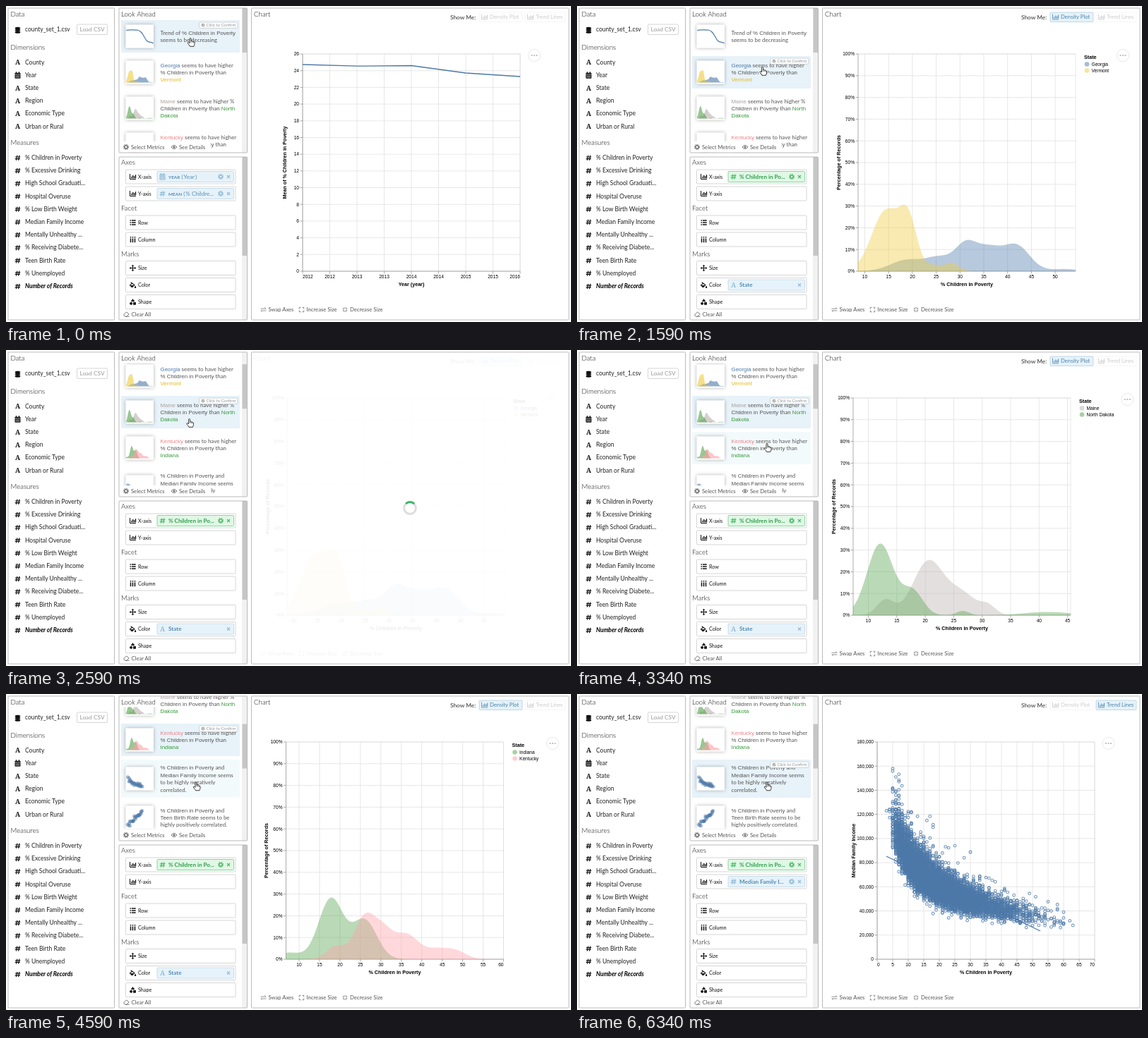
An HTML page for the animation above (6.49 s loop, 800 px wide and 448 px high).

```html
<!DOCTYPE html>
<html lang="en">
<head>
<meta charset="utf-8">
<title>Look Ahead chart explorer</title>
<style>
  html, body { margin: 0; width: 100%; height: 100%; overflow: hidden; background: #fff; }
  svg { display: block; width: 100vw; height: 100vh; font-family: Lato, sans-serif; fill: #222; }
  .arial { font-family: "Liberation Sans", Arial, sans-serif; }
  .light { font-weight: 300; }
  .bold { font-weight: 700; }
  .mid { text-anchor: middle; }
  .end { text-anchor: end; }
</style>
</head>
<body>
<svg id="stage" viewBox="0 0 800 448"></svg>
<script>
const LOOP = 6490;
const BLUE = '#4c78a8', YELLOW = '#eeca3b', GREEN = '#54a24b', GRAY = '#bab0ac', PINK = '#ff9da6';
const range = n => [...Array(n).keys()];
const each = (list, f) => list.map(f).join('');

// Drawing helpers; text is centred vertically on y
const text = (x, y, s, size = 8.5, cls = '', fill = '#222') =>
  `<text x="${x}" y="${y + size * .35}" font-size="${size}" class="${cls}" fill="${fill}">${s}</text>`;
const rect = (x, y, w, h, fill = '#fff', stroke = 'none', r = 0) =>
  `<rect x="${x}" y="${y}" width="${w}" height="${h}" rx="${r}" fill="${fill}" stroke="${stroke}" stroke-width=".8"/>`;
const line = (d, stroke, w = 1, extra = '') =>
  `<path d="${d}" fill="none" stroke="${stroke}" stroke-width="${w}" ${extra}/>`;
const fill = (d, color, alpha = 1) => `<path d="${d}" fill="${color}" fill-opacity="${alpha}"/>`;
const dot = (x, y, r, color, extra = '') => `<circle cx="${x}" cy="${y}" r="${r}" fill="${color}" ${extra}/>`;
const at = (x, y, s) => `<g transform="translate(${x} ${y})">${s}</g>`;
const group = (id, s) => `<g id="${id}">${s}</g>`;

const icons = {
  hash: c => line('M-.6-3.6l-1.5 7.2M2.5-3.6l-1.5 7.2M-3.4-1.3h7.2M-3.8 1.3h7.2', c, 1.2),
  letter: c => `<text y="3.3" font-size="9.5" text-anchor="middle" font-weight="900" font-family="Noto Serif, serif" fill="${c}">A</text>`,
  calendar: c => rect(-4, -3.5, 8, 8, c, 'none', .8) + line('M-2-5v2.5M2-5v2.5', c, 1.3) +
    line('M-4-1.2h8M-3 1h6M-3 2.8h6', '#fff', .6),
  database: c => each(range(3), i => fill(`M-3.7 ${i * 2.8 - 3.3}q3.7-1.8 7.4 0v1.6q-3.7 1.8-7.4 0z`, c)),
  gear: c => `<g fill="none" stroke="${c}"><circle r="2.2" stroke-width="1.6"/><circle r="3.4" stroke-width="1.2" stroke-dasharray="1.4 1.27"/></g>`,
  eye: c => line('M-4 0Q0-5 4 0Q0 5-4 0z', c, 1) + dot(0, 0, 1.6, c),
  bars: c => line('M-4-4v7.5h8.5', c, 1) + line('M-1.8 2.2v-2.5M.2 2.2v-4.2M2.2 2.2v-3M4 2.2v-5', c, 1.3),
  rows: c => line('M-4-3h1.6M-4 0h1.6M-4 3h1.6M-1.5-3h5.7M-1.5 0h5.7M-1.5 3h5.7', c, 1.5),
  columns: c => `<g transform="rotate(90)">${icons.rows(c)}</g>`,
  move: c => line('M-3.6 0h7.2M0-3.6v7.2', c, 1.1) +
    fill('M-4.8 0l2-1.8v3.6zM4.8 0l-2-1.8v3.6zM0-4.8l-1.8 2h3.6zM0 4.8l-1.8-2h3.6z', c),
  paint: c => line('M-2.8-3.8L2.4 0L-1 3.2L-4 .2L-.6-2.4', c, 1.1) + fill('M-3.6.5h5.4l-2.8 2.8zM3.6 1q2.4 3.4 0 3.4t0-3.4', c),
  shapes: c => fill('M0-4.6l2.8 4.2h-5.6z', c) + dot(-2.4, 2.2, 2, c) + rect(.6, .4, 3.8, 3.8, c),
  erase: c => line('M-1 3.2h5M-4 1l4-4.2l3.6 3l-3.2 3.4h-2.6z', c, 1),
  cross: c => line('M-2-2l4 4M2-2l-4 4', c, 1.2),
  swap: c => line('M-4-1.4h7.6l-1.7-1.6M4 1.4h-7.6l1.7 1.6', c, .8),
  expand: c => line('M-3.2-1v-2.2h2.2M1-3.2h2.2v2.2M3.2 1v2.2h-2.2M-1 3.2h-2.2v-2.2', c, .9),
  shrink: c => line('M-3.4-1.2h2.2v-2.2M1.2-3.4v2.2h2.2M3.4 1.2h-2.2v2.2M-1.2 3.4v-2.2h-2.2', c, .9),
};
const icon = (name, x, y, color = '#111') => at(x, y, icons[name](color));

const TOP = 68, BASE = 376, SIDE = 308;

function axes(x0, xTicks, yLabels, xTitle, yTitle, titleX) {
  const x1 = x0 + SIDE, step = SIDE / (yLabels.length - 1);
  let grid = '', ticks = '', labels = '';
  for (const [x, s] of xTicks) {
    const first = x < x0 + 1, last = x > x1 - 2;
    grid += `M${x} ${TOP}V${BASE}`;
    ticks += `M${x} ${BASE}v3.5`;
    labels += text(first ? x0 : last ? x1 : x, 384, s, 6.6, 'arial ' + (first ? '' : last ? 'end' : 'mid'), '#000');
  }
  yLabels.forEach((s, i) => {
    const y = BASE - i * step;
    grid += `M${x0} ${y}H${x1}`;
    ticks += `M${x0} ${y}h-3.5`;
    labels += text(x0 - 5, y, s, 6.6, 'arial end', '#000');
  });
  return line(grid, '#ddd', .7) + line(`M${x0} ${TOP}H${x1}V${BASE}`, '#ddd', .7) +
    line(ticks + `M${x0} ${TOP}V${BASE}H${x1}`, '#888', .7) + labels +
    text(x0 + SIDE / 2, 394, xTitle, 7.16, 'arial bold mid', '#000') +
    `<g transform="translate(${titleX} 222) rotate(-90)">${text(0, 0, yTitle, 7.16, 'arial bold mid', '#000')}</g>`;
}
const fives = (start, x, gap, n) => range(n).map(i => [x + i * gap, start + 5 * i]);
const moreButton = x => dot(x, 70, 8.6, '#fff', 'stroke="#e2e2e2" stroke-width=".8"') +
  each([-3.5, 0, 3.5], d => dot(x + d, 70, 1.1, '#b5b5b5'));

// Each state's density is a sum of bell curves: [poverty %, width, height %]
const states = {
  Vermont: { color: YELLOW, ink: '#e3b920', bells: [[14.5, 3, 28], [19.2, 1.8, 20.5], [24.5, 1.6, 2.6], [28.3, 1.4, 3.8]] },
  Georgia: { color: BLUE, ink: BLUE, bells: [[19, 3.5, 5.3], [25.5, 2.5, 5.5], [31.3, 2.4, 12.8], [36.2, 2.4, 9], [41.8, 2.8, 12], [52, 3, 1]] },
  'North Dakota': { color: GREEN, ink: '#36993a', bells: [[12.1, 2.3, 33], [17.8, 1.8, 11], [26.6, 1.1, 2], [41.5, 4, 1.5]] },
  Maine: { color: GRAY, ink: '#aaa29f', bells: [[13, 1.5, 7], [20.6, 2.7, 25], [26.5, 2.4, 9.5], [31, 1.4, 4]] },
  Indiana: { color: GREEN, ink: '#36993a', bells: [[7.5, 3, 3], [17.8, 3, 28], [26, 3, 18]] },
  Kentucky: { color: PINK, ink: '#f08088', bells: [[19, 2.3, 6], [26, 2.5, 19], [30.6, 2.4, 12], [36.3, 2.8, 11], [43.5, 3, 4.5], [48.5, 2.5, 3.3]] },
};
const share = (name, v) => states[name].bells.reduce((sum, [c, w, h]) => sum + h * Math.exp(-(((v - c) / w) ** 2) / 2), 0);

// x10: where 10 % stands, unit: pixels per 1 %
const plots = [
  { names: ['Georgia', 'Vermont'], x0: 398, x10: 407.5, unit: 6.74, legendX: 718, moreX: 773 },
  { names: ['Maine', 'North Dakota'], x0: 391, x10: 412.5, unit: 8.06, legendX: 711, moreX: 779.5 },
  { names: ['Indiana', 'Kentucky'], x0: 396.5, x10: 415, unit: 5.79, legendX: 716.5, moreX: 774 },
];
const samples = range(103).map(i => i * SIDE / 102);
const valueAt = (p, dx) => 10 + (p.x0 + dx - p.x10) / p.unit;

// Filled density curves, standing on the origin
const areas = (p, width, perPercent, alpha) => each(p.names, name => {
  const top = samples.map(dx => `L${(dx * width / SIDE).toFixed(2)} ${(-share(name, valueAt(p, dx)) * perPercent).toFixed(2)}`);
  return fill(`M0 0${top.join('')}V0z`, states[name].color, alpha);
});
function miniAreas(p) {
  const peak = Math.max(...p.names.flatMap(name => samples.map(dx => share(name, valueAt(p, dx)))));
  return at(170, 14.5, areas(p, 38, 17.5 / peak, .6));
}
const density = p =>
  axes(p.x0, fives(10, p.x10, p.unit * 5, Math.floor((p.x0 + SIDE + 1 - p.x10) / p.unit / 5) + 1),
    range(11).map(i => i * 10 + '%'), '% Children in Poverty', 'Percentage of Records', p.x0 - 28) +
  at(p.x0, BASE, areas(p, SIDE, SIDE / 100, .4)) + text(p.legendX, 72, 'State', 7.16, 'arial bold', '#000') +
  each(p.names, (name, i) => dot(p.legendX + 4, 82.5 + i * 9, 3.3, states[name].color, 'fill-opacity=".5"') +
    text(p.legendX + 10.5, 82.5 + i * 9, name, 6.6, 'arial', '#000')) + moreButton(p.moreX);

let seed = 7;
const random = () => (seed = (seed * 16807) % 2147483647) / 2147483647;
const gauss = () => Math.sqrt(-2 * Math.log(random())) * Math.cos(2 * Math.PI * random());

// Income falls with poverty, with log-normal noise and a few high outliers
function scatter() {
  const layers = Array(8).fill('');
  for (let i = 0; i < 9000; i++) {
    const g = gauss(), poverty = Math.round(20.5 + 9.2 * g + 1.6 * (g * g - 1) + .8 * gauss());
    const e = gauss(), noise = e > 0 && random() < .05 ? 2 * e : e;
    const income = 84 * ((poverty + 2) / 12) ** -.56 * Math.exp(noise * .12);
    if (poverty < 3 || poverty > 66 || income > 170) continue;
    const x = 425 + poverty * 4.4, y = BASE - income * SIDE / 180;
    layers[i % 8] += `M${(x - 1.9).toFixed(1)} ${y.toFixed(1)}a1.9 1.9 0 1 0 3.8 0a1.9 1.9 0 1 0-3.8 0`;
  }
  return each(layers, d => line(d, BLUE, 1.1, 'stroke-opacity=".75"'));
}

const charts = [
  axes(420, range(9).map(i => [420 + i * SIDE / 8, 2012 + (i >> 1)]), range(14).map(i => 2 * i),
    'Year (year)', 'Mean of % Children in Poverty', 394.5) +
    line('M420 83L497 85.2L574 84.5L651 95L728 100', BLUE, 1.3) + moreButton(748),
  ...plots.map(density),
  axes(425, fives(0, 425, 22, 15), range(10).map(i => (i * 20000).toLocaleString('en-US')),
    '% Children in Poverty', 'Median Family Income', 391) +
    scatter() + line('M438 230L656 336', BLUE, 1.2) + moreButton(752.5),
];

// Suggestion cards
const field = (s, color = '#555') => `<tspan class="arial" fill="${color}">${s}</tspan>`;
const state = (name, part = name) => field(part, states[name].ink);
const poverty = field('% Children in Poverty');
const miniDots = y => each(range(26), i => {
  const u = i / 25;
  return dot(173 + 20 * u + gauss(), y(u) + 1.5 * gauss(), 2.5, BLUE, 'fill-opacity=".5"');
});
let cardTop = 20;
const cards = [
  { mini: line('M170-8.5C177-10 181-8.5 186-9C193-8 195 1 199 6C203 10 206 7 208.5 10', BLUE, 1.2),
    lines: ['Trend of ' + poverty, 'seems to be decreasing'] },
  { mini: miniAreas(plots[0]), lines: [state('Georgia') + ' seems to have higher', poverty + ' than', state('Vermont')] },
  { mini: miniAreas(plots[1]), lines: [state('Maine') + ' seems to have higher %',
    field('Children in Poverty') + ' than ' + state('North Dakota', 'North'), state('North Dakota', 'Dakota')] },
  { mini: miniAreas(plots[2]), lines: [state('Kentucky') + ' seems to have higher', poverty + ' than', state('Indiana')] },
  { mini: miniDots(u => -2 + 13 * Math.sqrt(u)),
    lines: [poverty + ' and', field('Median Family Income') + ' seems', 'to be highly negatively', 'correlated.'] },
  { mini: miniDots(u => 11 - 19 * u),
    lines: [poverty + ' and', field('Teen Birth Rate') + ' seems to be', 'highly positively correlated.'] },
];
for (const c of cards) {
  c.h = Math.max(46, c.lines.length * 13.5);
  c.top = cardTop;
  cardTop += c.h + 5;
}
const card = ({ top, h, lines, mini }, i) => at(0, top + h / 2,
  `<rect id="card${i}" x="163" y="${-h / 2}" width="168" height="${h}"/>` +
  `<rect x="169.5" y="-16.5" width="39.5" height="33" fill="#fff" filter="url(#shadow)"/>` + mini +
  each(lines, (s, k) => text(218.5, (k - (lines.length - 1) / 2) * 10.4 + .3, s, 7.9, '', '#555')));
const badge = rect(273.5, 3, 54.5, 8.4, '#fbfdfe', '#ccc', 2) + dot(279, 7.2, 2.4, '#aaa') +
  line('M277.8 7.2l1 1l1.6-2', '#fff', .7) + text(283.5, 7.2, 'Click to Confirm', 5.9, '', '#999');

// Encoding shelves
function pill(y, iconName, label, green, gear = true) {
  const color = green ? '#2f9e4d' : '#548cb5', soft = green ? '#4fbb6c' : '#93bcd8';
  return rect(214, y - 7.5, 108.5, 15, green ? '#e0f8e5' : '#e6f2f9', green ? '#74cf8a' : '#bdd6e6', 1) +
    icon(iconName, 221.5, y, soft) + text(230, y, label, 8.1, 'bold', color) +
    (gear ? icon('gear', 304, y, soft) : '') + icon('cross', 315, y, soft);
}
const fn = (name, arg) => `<tspan font-size="6.4">${name}</tspan><tspan font-weight="400"> (&#8201;${arg}</tspan>`;
function showMe(active) {
  const button = (x, w, label, on) => rect(x, 9, w, 13.5, on ? '#e6f2f9' : '#fff', on ? '#b5d0e3' : '#f3f3f3', 1) +
    icon('bars', x + 7.5, 15.5, on ? '#6d9dc0' : '#d2d2d2') + text(x + 15, 15.6, label, 7.7, '', on ? '#4a83ad' : '#ccc');
  return button(670, 61, 'Density Plot', active === 1) + button(735, 57, 'Trend Lines', active === 2);
}
const povertyPill = pill(242, 'hash', '% Children in Po...', true);
const encodings = [
  pill(242, 'calendar', fn('YEAR', 'Year&#8201;)')) + pill(266, 'hash', fn('MEAN', '% Childre...')),
  povertyPill + pill(395.5, 'letter', 'State', false, false),
  povertyPill + pill(266, 'hash', 'Median Family I...'),
].map((s, i) => s + showMe(i));

const shelf = (y, rows) => each(rows, ([name, s], i) => at(169.5, y + i * 24,
  rect(0, -10, 155.5, 20, '#fff', '#ccc', 1) + icon(name, 10, 0) + text(17.5, 0, s, 7.2, '', '#111')));
const list = (y, names, iconOf) => each(names, (s, i) =>
  icon(iconOf(s), 16.5, y + .3 + i * 18.2) + text(27, y + i * 18.2, s));
const dimensions = ['County', 'Year', 'State', 'Region', 'Economic Type', 'Urban or Rural'];
const measures = ['% Children in Poverty', '% Excessive Drinking', 'High School Graduati...', 'Hospital Overuse',
  '% Low Birth Weight', 'Median Family Income', 'Mentally Unhealthy ...', '% Receiving Diabete...', 'Teen Birth Rate', '% Unemployed'];
const panel = (x, y, w, h) => rect(x, y, w, h, 'none', '#aaa', 1);
const heading = (x, y, s) => text(x, y, s, 9.7, 'light', '#111');
const action = (x, y, name, s) => icon(name, x, y, '#777') + text(x + 7, y, s, 7.65, '', '#555');

document.getElementById('stage').innerHTML =
  `<defs><filter id="shadow" x="-40%" y="-40%" width="180%" height="180%"><feDropShadow dx="0" dy="0" stdDeviation="2.6" flood-color="#777" flood-opacity=".6"/></filter>
   <clipPath id="clip"><rect x="160.5" y="3.5" width="173.5" height="204"/></clipPath></defs>` +
  // data panel
  panel(3, 3, 150.5, 442) + heading(6.5, 11.5, 'Data') + icon('database', 16.5, 34) + text(27, 33.5, 'county_set_1.csv') +
  rect(100.5, 26, 43, 14.5, '#fff', '#ccc', 1.5) + text(122, 33.3, 'Load CSV', 8.3, 'mid', '#999') +
  heading(6.5, 58.5, 'Dimensions') + list(79.7, dimensions, s => s === 'Year' ? 'calendar' : 'letter') +
  heading(6.5, 194, 'Measures') + list(215, measures, () => 'hash') +
  icon('hash', 16.5, 397.5) + `<g font-style="italic">${text(27, 397.2, 'Number of Records', 8.5, 'bold', '#000')}</g>` +
  // suggestions
  `<g clip-path="url(#clip)">${group('cards', each(cards, card) + group('badge', badge))}</g>` +
  rect(161, 4, 52, 14.5) + rect(161, 192, 128.7, 15.5) + heading(163, 11.5, 'Look Ahead') +
  action(170, 200, 'gear', 'Select Metrics') + action(238, 200, 'eye', 'See Details') +
  rect(334, 3, 7.5, 205, '#f1f1f1') + `<rect id="thumb" x="334.5" width="6.5" height="63" fill="#c6c6c6"/>` +
  panel(160, 3, 181.5, 205) +
  // shelves
  heading(163, 222, 'Axes') + shelf(242, [['bars', 'X-axis'], ['bars', 'Y-axis']]) +
  heading(163, 287, 'Facet') + shelf(307, [['rows', 'Row'], ['columns', 'Column']]) +
  heading(163, 351.5, 'Marks') + shelf(371.5, [['move', 'Size'], ['paint', 'Color'], ['shapes', 'Shape']]) +
  rect(161, 430, 172, 14) + action(170.5, 437, 'erase', 'Clear All') +
  rect(334, 214, 7.5, 231, '#f1f1f1') + rect(334.5, 214, 6.5, 140, '#c6c6c6') + panel(160, 214, 181.5, 231) +
  // chart panel
  heading(351, 11.5, 'Chart') + text(629, 15.6, 'Show Me:', 8.3, '', '#333') +
  each(encodings, (s, i) => group('encoding' + i, s)) + each(charts, (s, i) => group('chart' + i, s)) +
  action(364.5, 430.5, 'swap', 'Swap Axes') + action(418.5, 430.5, 'expand', 'Increase Size') +
  action(480, 430.5, 'shrink', 'Decrease Size') +
  `<rect id="veil" x="348" y="4" width="448" height="440" fill="#fff"/>` + panel(347.5, 3, 449.5, 442) +
  group('spinner', `<circle r="8.4" fill="none" stroke="#ddd" stroke-width="3"/>` + line('M-5.94-5.94A8.4 8.4 0 0 1 5.94-5.94', '#3fb56b', 3)) +
  group('cursor', `<path d="M-1 1.1C-1-.4 1-.4 1 1.1V4.2C1.6 3.6 2.8 3.8 2.9 4.6C3.6 4.2 4.5 4.6 4.6 5.3C5.4 5 6 5.5 6 6.3V8.2C6 10 5 10.5 5 11.8H-.6C-.8 10.4-3.6 8-3.7 6.9C-3.7 6-2.4 5.9-1.7 6.7L-1 7.4z" fill="#fff" stroke="#222" stroke-width=".9"/>` +
    line('M1 4.2v2.3M2.9 4.6v2M4.6 5.3v1.6', '#222', .6));

// Each preview: pointer enters the card, click, chart ready
const previews = [
  { hover: 0, click: 0, ready: 0 },
  { hover: 340, click: 740, ready: 1340 },
  { hover: 2190, click: 2390, ready: 2990 },
  { hover: 3340, click: 3590, ready: 3590 },
  { hover: 4390, click: 4990, ready: 6190 },
];
const encodingOf = [0, 1, 1, 1, 2];
const ease = u => (u = Math.max(0, Math.min(1, u)), u * (2 - u));
const follow = (t, start, moves) => moves.reduce((v, [from, to, goal]) => v + (goal - v) * ease((t - from) / (to - from)), start);

const el = id => document.getElementById(id);
const move = (id, x, y, extra = '') => el(id).setAttribute('transform', `translate(${x} ${y}) ${extra}`);
const showOnly = (name, list, n) => list.forEach((_, i) => el(name + i).style.display = i === n ? '' : 'none');

function draw() {
  const t = performance.now() % LOOP;
  const beat = Math.floor((t + 15) / 200) * 200 - 10;
  const latest = key => previews.findLastIndex(p => p[key] <= t);
  const selected = latest('click'), hovered = latest('hover'), { click, ready } = previews[selected];
  const veil = t < ready ? .925 * Math.min(1, (t - click + 100) / 300) : 0;
  const scroll = follow(beat, 0, [[1900, 2390, 57], [3900, 4390, 131]]);

  move('cards', 0, -scroll);
  move('badge', 0, cards[selected].top);
  move('cursor', follow(beat, 261, [[340, 590, 262.5], [1990, 2390, 259.5], [2990, 3190, 269]]),
    follow(beat, 45.5, [[340, 590, 86.5], [1990, 2390, 97.5], [2990, 3190, 132.5], [3990, 4390, 125]]));
  el('thumb').setAttribute('y', 3 + scroll * .302);
  cards.forEach((_, i) => el('card' + i).setAttribute('fill',
    i === selected ? '#e7f2f9' : i === hovered ? '#f3fafc' : '#fff'));
  showOnly('encoding', encodings, encodingOf[selected]);
  showOnly('chart', charts, latest('ready'));
  el('veil').setAttribute('opacity', veil);
  el('spinner').setAttribute('opacity', Math.min(1, veil * 1.1));
  move('spinner', 572, 224, `rotate(${(t - 2590) / 595 * 360})`);
  requestAnimationFrame(draw);
}
draw();
</script>
</body>
</html>
```
